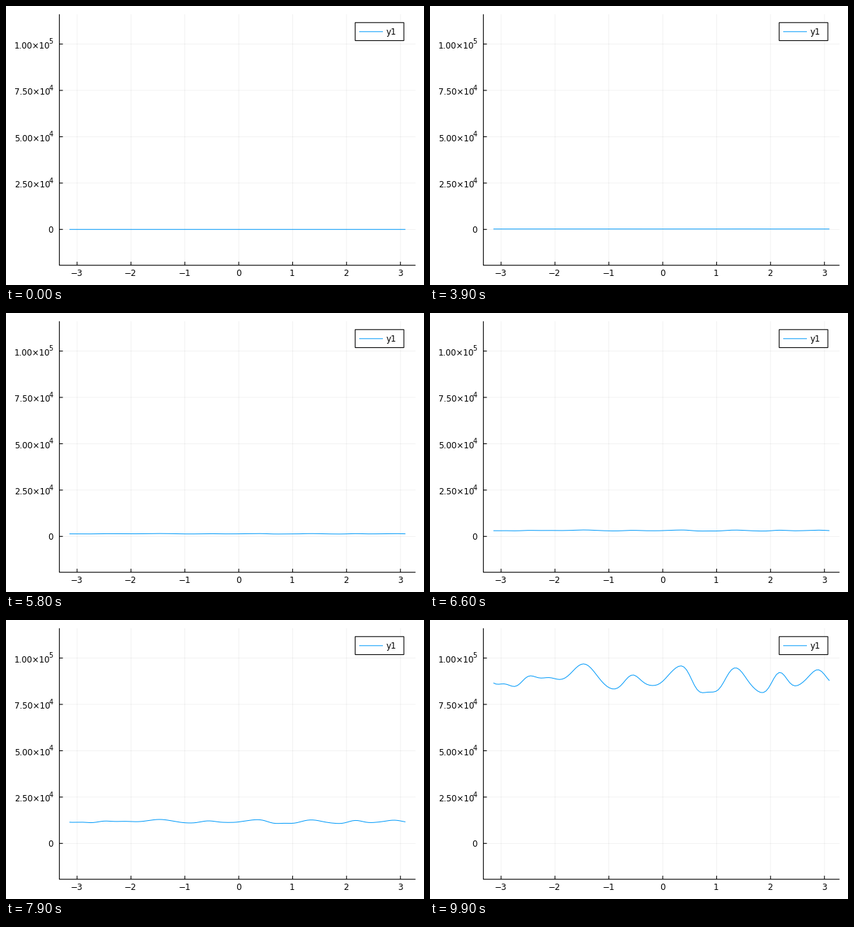
Recreate the animation shown at these times as a matplotlib script. Size 600 by 400 pixels, loop 10 s.

```python
import numpy as np
import matplotlib.pyplot as plt
from matplotlib.animation import FuncAnimation
from matplotlib.patches import Rectangle

WIDTH, HEIGHT, DPI = 600, 400, 100
FRAMES, INTERVAL = 100, 100
PT = 72 / DPI
LEFT, RIGHT, TOP, BOTTOM = 76.6, 587.8, 11.8, 371.7
X0, X_UNIT = 334.1, 77.36
Y0, Y_STEP = 320.3, 66.44
BLUE = "#009afa"

plt.rcParams.update({"font.family": "DejaVu Sans", "path.snap": False,
                     "lines.solid_capstyle": "butt"})
fig = plt.figure(figsize=(WIDTH / DPI, HEIGHT / DPI), dpi=DPI, facecolor="white")
ax = fig.add_axes([0, 0, 1, 1])
ax.set(xlim=(0, WIDTH), ylim=(HEIGHT, 0))
ax.axis("off")


def line(xs, ys, color="black", width=1.1, **style):
    return ax.plot(xs, ys, color=color, lw=width * PT, **style)[0]


def grid(xs, ys):
    line(xs, ys, width=0.7, alpha=0.075)


def label(x, y, text, ha="center", size=12):
    ax.text(x, y, text, ha=ha, va="baseline", fontsize=size * PT)


def draw_axes():
    for n in range(-3, 4):
        x = X0 + n * X_UNIT
        grid([x, x], [TOP, BOTTOM])
        line([x, x], [BOTTOM, BOTTOM - 5])
        label(x - 0.5, 387.4, str(n).replace("-", "\u2212"))
    for i in range(5):
        y = Y0 - i * Y_STEP
        grid([LEFT, RIGHT], [y, y])
        line([LEFT, LEFT + 5], [y, y])
        if i == 0:
            label(68, y + 4.4, "0", "right")
        else:
            mantissa, power = (1, 5) if i == 4 else (2.5 * i, 4)
            label(63.3, y + 6.3, f"{mantissa:.2f}\u00d710", "right")
            label(67.7, y - 0.2, str(power), "right", 9.6)
    line([LEFT, LEFT, RIGHT], [TOP, BOTTOM, BOTTOM])


def draw_legend():
    ax.add_patch(Rectangle((501.2, 23.8), 69.9, 25.8, fc="white", ec="black",
                           lw=1.1 * PT, zorder=3))
    line([507, 541], [36.8, 36.8], BLUE, 1, zorder=4)
    label(545.5, 41.2, "y1", "left")


# Crests and troughs of the last wave, in stage pixels.
TURNS = [(97, 92), (106, 91.6), (121, 95), (143, 80), (159, 83), (170, 82.6),
         (186, 85), (220, 63), (265, 98.6), (290, 79), (319, 94), (361, 65.7),
         (392, 104.3), (407, 102.8), (437.5, 68.7), (477.5, 103.6), (502, 75),
         (524, 94), (557, 71.5)]
POINTS, MODES = 128, 20
GROWTH, DIFFUSION, END = 1.009, 7e-4, 9.9


def wave_heights(x):
    """Ease between turning points, with crests narrower than troughs."""
    period = 2 * np.pi * X_UNIT
    first, last = TURNS[0], TURNS[-1]
    turns = np.array([(last[0] - period, last[1]), *TURNS,
                      (first[0] + period, first[1])])
    i = np.searchsorted(turns[:, 0], x) - 1
    (xa, ya), (xb, yb) = turns[i].T, turns[i + 1].T
    turn = np.cos(np.pi * (x - xa) / (xb - xa))
    rise = (1 + np.where(ya < yb, turn, -turn)) / 2
    return Y0 - np.maximum(ya, yb) + np.abs(yb - ya) * rise ** 1.2


xs = X0 + X_UNIT * np.pi * (2 * np.arange(POINTS) / POINTS - 1)
spectrum = np.fft.rfft(wave_heights(xs))[:MODES]
decay = DIFFUSION * np.arange(MODES) ** 2

draw_axes()
draw_legend()
curve = line(xs, np.full(POINTS, Y0), BLUE, 1, zorder=2.5)


def update(frame):
    """Exponential growth while diffusion slowly smooths the wave."""
    left = END - frame * INTERVAL / 1000
    shape = np.fft.irfft(spectrum * np.exp(decay * min(left, 2.5)), POINTS)
    curve.set_ydata(Y0 - shape * np.exp(-GROWTH * left))
    return (curve,)


animation = FuncAnimation(fig, update, frames=FRAMES, interval=INTERVAL,
                          repeat=True, repeat_delay=0)
plt.show()
```
